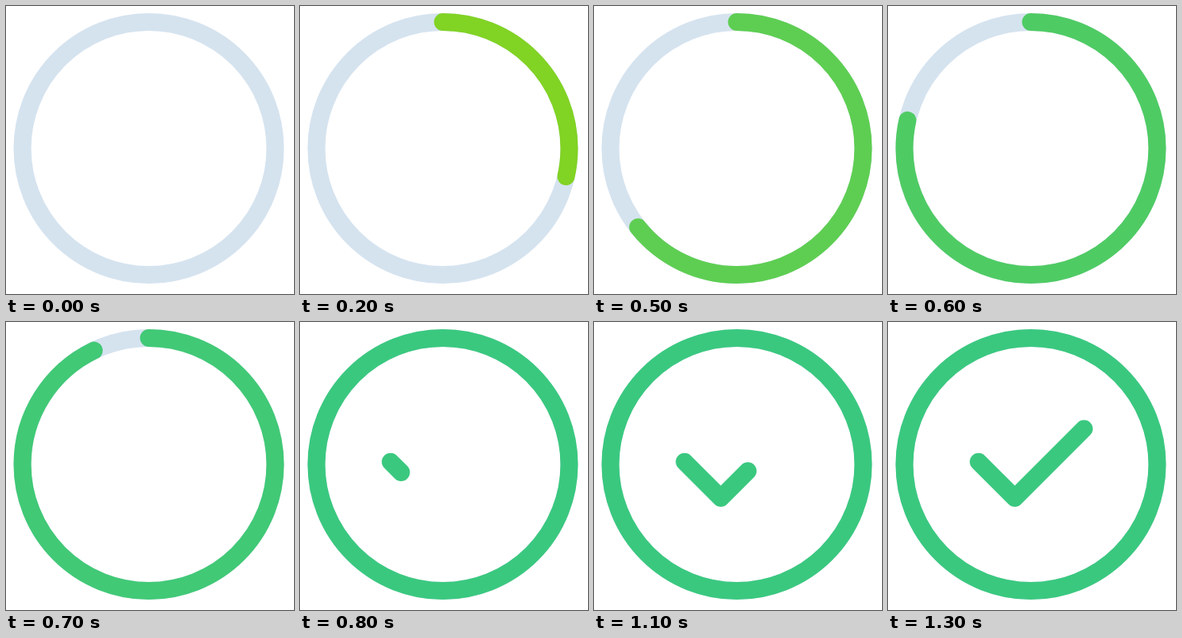
An HTML page that plays this animation: 360x360 px, repeating every 1.6 s.

```html
<!DOCTYPE html>
<html lang="en">
<head>
<meta charset="utf-8">
<title>Success check</title>
<style>
  html, body { margin: 0; width: 100%; height: 100%; overflow: hidden; background: #fff; }
  svg { display: block; width: 100vw; height: 100vh; }
</style>
</head>
<body>
<svg viewBox="0 0 360 360" fill="none" stroke-width="22" stroke-linecap="round" stroke-linejoin="round">
  <circle cx="178.5" cy="178" r="158" stroke="#d5e3ef"/>
  <g id="ink">
    <circle id="ring" cx="178.5" cy="178" r="158" pathLength="1" transform="rotate(-90 178.5 178)"/>
    <path id="tick" d="M113.2 174.7 158.5 220 245 133.5" pathLength="1"/>
  </g>
</svg>
<script>
const LOOP = 1600, STEP = 100, LAST = 13;
const RING_TICKS = 14, CHECK_TICKS = 10;
const FROM = [158, 216, 0], TO = [58, 200, 127];
const [ink, ring, tick] = ['ink', 'ring', 'tick'].map(id => document.getElementById(id));
const clamp = x => Math.min(1, Math.max(0, x));

function reveal(el, p) {
  el.setAttribute('visibility', p > 0 ? 'visible' : 'hidden');
  el.setAttribute('stroke-dasharray', p < 1 ? `${p} 2` : 'none');
}

function draw(ms) {
  // Each held pose falls on a whole tick: 14 for the ring, then 10 for the check.
  const step = Math.min(LAST, Math.floor(ms / STEP));
  const ticks = Math.round(step * (RING_TICKS + CHECK_TICKS) / LAST);
  const p = clamp(ticks / RING_TICKS);
  const rgb = FROM.map((c, i) => Math.round(c + (TO[i] - c) * p));
  ink.setAttribute('stroke', `rgb(${rgb})`);
  reveal(ring, p);
  reveal(tick, clamp((ticks - RING_TICKS) / CHECK_TICKS));
}

let start;
function frame(now) {
  start ??= now;
  draw((now - start) % LOOP);
  requestAnimationFrame(frame);
}
draw(0);
requestAnimationFrame(frame);
</script>
</body>
</html>
```
